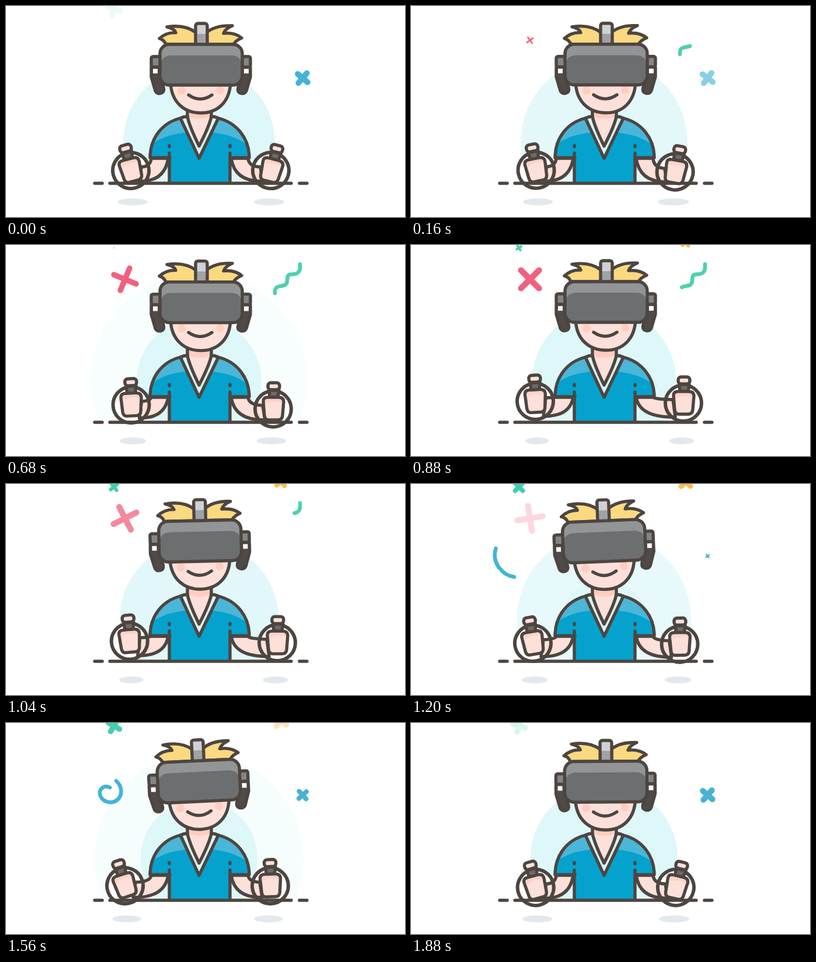
Animation of 684 by 363 pixels, one loop 1920 ms. Source, as an HTML page:

```html
<!DOCTYPE html>
<html lang="en">
<head>
<meta charset="utf-8">
<title>VR player</title>
<style>
  html, body { margin: 0; width: 100%; height: 100%; overflow: hidden; background: #fff; }
  svg { display: block; width: 684px; height: 363px; }
  .ink { stroke: #4d4540; stroke-width: 5.4; stroke-linecap: round; stroke-linejoin: round; }
  .line { fill: none; }
  .skin { fill: #fde0da; }
  .blush { fill: #ffcdbf; }
  .hair { fill: #fbd980; }
  .ring { fill: none; stroke-width: 6; }
  .curve { fill: none; stroke-width: 6.5; stroke-linecap: round; stroke-linejoin: round; }
  .cross { fill: none; stroke-linecap: round; }
</style>
</head>
<body>
<svg viewBox="0 0 684 363">
  <defs>
    <clipPath id="sky"><rect width="684" height="304"/></clipPath>
    <clipPath id="shirt"><path d="M299 193C267 201 247 228 247 261H281V304H384V261H417C417 228 396 201 364 193L331 262Z"/></clipPath>
    <g id="controller">
      <circle class="ink ring" r="31"/>
      <rect class="ink skin" x="-9" y="-45" width="20" height="12" rx="5"/>
      <path class="ink" fill="#6d6a69" d="M-7-32H10L8-20H-6Z"/>
      <path class="ink skin" d="M-17-13Q-17-20-9-20H9Q18-20 18-12L16 12Q15 19 8 19H-8Q-14 19-15 12Z"/>
      <path fill="#ffd2c8" d="M-14-8V-11Q-14-17-8-17H9Q15-17 15-11Q0-15-14-8Z"/>
    </g>
  </defs>

  <g clip-path="url(#sky)" fill="#def7f9">
    <circle class="halo" cx="331" cy="233"/>
    <circle class="halo" cx="331" cy="233"/>
  </g>
  <g fill="#e2e9ed">
    <ellipse class="shadow" cy="337" ry="6"/>
    <ellipse class="shadow" cy="337" ry="6"/>
  </g>

  <g id="confetti"></g>
  <path class="curve" id="wave" pathLength="1" stroke="#4fcfb0" d="M461 83C460 68 472 72 478 69S481 60 483 54S495 52 500 48S504 40 504 33"/>
  <path class="curve" id="spiral" pathLength="1" stroke="#42b4d6" d="M177 160C155 156 137 134 146 109C152 92 172 88 184 96C198 104 201 121 193 130C184 140 168 138 162 126C157 114 168 106 178 111"/>

  <circle class="disc" r="31" fill="#fff"/>
  <circle class="disc" r="31" fill="#fff"/>
  <path class="arm ink skin"/>
  <path class="arm ink skin"/>

  <path class="skin" d="M311 170H352V194L331 243L311 194Z"/>
  <path class="blush" d="M311 180H352V190Q331 198 311 190Z"/>
  <path class="ink line" d="M311 178V193M352 178V193"/>
  <g clip-path="url(#shirt)">
    <rect x="240" y="185" width="182" height="122" fill="#4bb6d8"/>
    <path fill="#05a2ce" d="M240 246C262 226 285 218 331 216C377 218 400 226 422 246V307H240Z"/>
  </g>
  <path class="ink" fill="#d8f4f4" d="M299 193Q305 190 311 190Q314 206 331 241Q349 206 352 190Q358 190 364 193L331 262Z"/>
  <path class="ink line" d="M299 193C267 201 247 228 247 261H281M364 193C396 201 417 228 417 261H384M280 253V304M384 253V304M280 240V242M384 240V242"/>

  <g id="head">
    <path class="ink skin" d="M282 130C283 166 306 184 334 184C362 184 384 166 385 130Z"/>
    <circle class="blush" cx="301" cy="146" r="7"/>
    <circle class="blush" cx="367" cy="145" r="7"/>
    <path class="ink line" d="M313 153Q333 167 353 153"/>
    <path class="ink hair" d="M326 46C312 35 295 33 276 36Q289 39 291 46Q275 45 263 56Q271 58 274 66H326Z"/>
    <path class="ink hair" d="M343 46C355 36 370 33 388 34Q376 39 373 47Q392 45 404 55Q394 59 390 66H343Z"/>
    <g id="strap">
      <rect class="ink" x="249" y="87" width="20" height="18" rx="3" fill="#858585"/>
      <path class="ink" fill="#504b48" d="M249 106V122L256 146Q259 152 266 150Q272 148 270 140L264 118V106Z"/>
      <rect x="252" y="108" width="8" height="8" fill="#fff"/>
    </g>
    <use href="#strap" transform="matrix(-1 0 0 1 668 0)"/>
    <rect x="325" y="30" width="20" height="38" rx="4" fill="#d0d1d4"/>
    <rect x="325" y="48" width="20" height="20" fill="#a1a2a5"/>
    <rect class="ink line" x="325" y="30" width="20" height="38" rx="4"/>
    <rect x="264" y="66" width="141" height="70" rx="16" fill="#929495"/>
    <path fill="#6c6f70" d="M265 104Q265 85 284 85H386Q404 85 404 104V120Q404 136 389 136H280Q265 136 265 120Z"/>
    <rect class="ink line" x="264" y="66" width="141" height="70" rx="16"/>
  </g>

  <path class="ink line" d="M152 305H165M178 305H489M503 305H516"/>
  <use class="hand" href="#controller"/>
  <use class="hand" href="#controller"/>
</svg>
<script>
const LOOP = 1920, STEP = 40;
const $ = id => document.getElementById(id);
const all = name => [...document.querySelectorAll('.' + name)];
const set = (el, attrs) => { for (const k in attrs) el.setAttribute(k, attrs[k]); };
const clamp = u => Math.min(1, Math.max(0, u));
const ease = u => u * u * (3 - 2 * u);
const age = (t, birth) => (t - birth + LOOP) % LOOP;
const halos = all('halo'), shadows = all('shadow'), discs = all('disc'), arms = all('arm'), hands = all('hand');

// Each hand eases between four poses: rest, turned, raised, spread
const poseTimes = [0, 480, 880, 1560, LOOP];
const sides = [
  { dir: 1, edge: 0, poses: [[214, 283, -15], [216, 281, -2], [213, 269, -3], [204, 280, -18]] },
  { dir: -1, edge: 664, poses: [[454, 283, 14], [449, 292, 0], [467, 272, 0], [453, 280, -2]] }
];

function drawHand({ dir, edge, poses }, i, t) {
  const k = poseTimes.findLastIndex(p => p <= t);
  const u = ease((t - poseTimes[k]) / (poseTimes[k + 1] - poseTimes[k]));
  const [x, y, tilt] = poses[k].map((v, j) => v + (poses[(k + 1) % 4][j] - v) * u);
  set(hands[i], { transform: `translate(${x} ${y}) rotate(${tilt})` });
  set(discs[i], { cx: x, cy: y });
  set(shadows[i], { cx: x + 3 * dir, rx: 26 + .42 * (y - 283) });
  const px = v => edge + dir * v, wrist = x + 14 * dir, under = 160 + y / 2;
  set(arms[i], { d: `M${px(249)} 262Q${px(248)} ${y - 7} ${wrist + 4 * dir} ${y - 6}L${wrist} ${under}Q${px(272)} ${under + 1} ${px(278)} 262Z` });
}

// Crosses grow while spinning, then fade
const crosses = [
  { color: '#f1607f', x: 204, y: 59, birth: 0, size: 22, weight: .46, angle: 36, spin: .1125, fadeAt: 960, fade: 320 },
  { color: '#45b3d4', x: 508.5, y: 124, birth: 1040, size: 11, weight: .9, angle: 58, spin: -.02, fadeAt: 920, fade: 320 },
  { color: '#42cfae', x: 185, y: 5, birth: 640, size: 11, weight: .85, angle: 67, spin: -.04, fadeAt: 920, fade: 400 },
  { color: '#fbbd4f', x: 471, y: -4, birth: 520, size: 12, weight: .8, angle: 58, spin: -.02, fadeAt: 800, fade: 400 }
];
for (const c of crosses) {
  c.el = document.createElementNS('http://www.w3.org/2000/svg', 'path');
  set(c.el, { class: 'cross', stroke: c.color });
  $('confetti').append(c.el);
}

function drawCross(c, t) {
  const a = age(t, c.birth);
  const arm = c.size * Math.sin(clamp(a / 880) * Math.PI / 2);
  set(c.el, {
    d: `M${-arm} 0H${arm}M0 ${-arm}V${arm}`, 'stroke-width': arm * c.weight,
    transform: `translate(${c.x} ${c.y}) rotate(${c.angle + c.spin * a})`,
    opacity: 1 - clamp((a - c.fadeAt) / c.fade)
  });
}

// Draw a curve on from its start, then wipe it off the same way
function drawCurve(id, t, onAt, on, offAt, off) {
  const start = clamp((t - offAt) / off), len = clamp((t - onAt) / on) - start;
  set($(id), { 'stroke-dasharray': `${len} 2`, 'stroke-dashoffset': -start, opacity: len > 0 ? 1 : 0 });
}

function draw(t) {
  const ages = [t, age(t, LOOP / 2)].sort((a, b) => b - a);
  halos.forEach((el, i) => set(el, { r: 51 + .082 * ages[i], opacity: 1 - clamp((ages[i] - 960) / 860) }));
  sides.forEach((side, i) => drawHand(side, i, t));
  const lift = 1.5 * Math.cos(2 * Math.PI * t / LOOP) - 1.5;
  const tilt = -3 * Math.sin(Math.PI * clamp((t - 900) / (LOOP - 900)));
  set($('head'), { transform: `translate(0 ${lift}) rotate(${tilt} 331 185)` });
  crosses.forEach(c => drawCross(c, t));
  drawCurve('wave', t, 80, 240, 840, 280);
  drawCurve('spiral', t, 1080, 400, 1200, 660);
}

const began = performance.now();
function tick() {
  const t = (performance.now() - began) % LOOP;
  draw(Math.floor(t / STEP) * STEP);
  requestAnimationFrame(tick);
}
tick();
</script>
</body>
</html>
```
